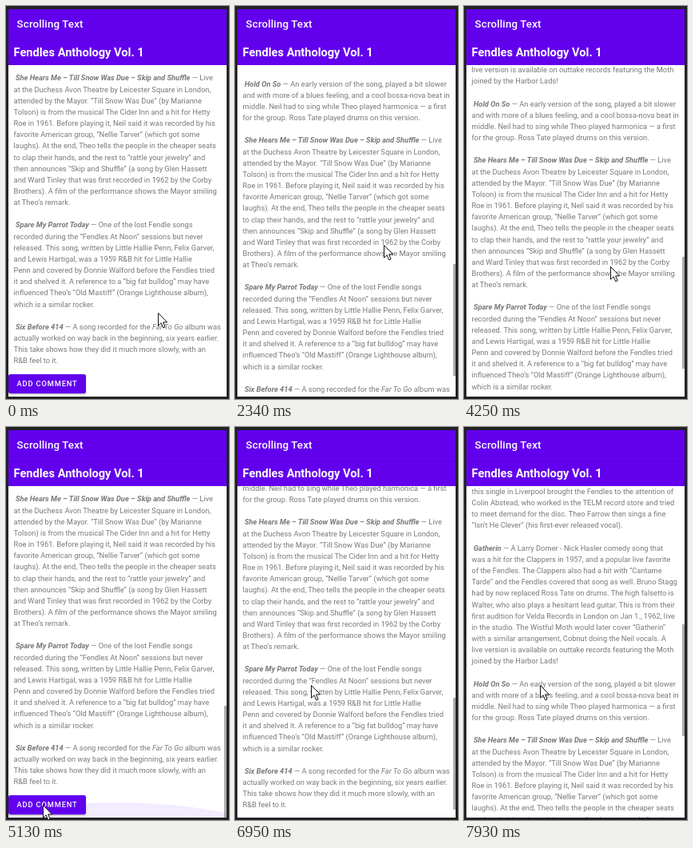
Write an HTML page that moves like this. It is 279 px wide and 492 px high and loops after 8 s.

```html
<!DOCTYPE html>
<html lang="en">
<head>
<meta charset="utf-8">
<title>Scrolling Text</title>
<style>
  html, body { margin: 0; width: 100%; height: 100%; overflow: hidden; background: #222225; }
  body { font-family: Roboto, "Open Sans", sans-serif; }
  #stage { position: relative; width: 279px; height: 492px; overflow: hidden; }
  #stage div, #stage svg { position: absolute; }
  #bar { left: 3px; top: 4px; width: 273px; height: 70px; background: #6200ee; color: #fff; white-space: pre; }
  #bar div { line-height: 20px; }
  #title { left: 10.6px; top: 9px; font-size: 13.28px; font-weight: 500; letter-spacing: .0125em; }
  #head { left: 6.6px; top: 44px; font-size: 14.6px; font-weight: 700; }
  #edge { left: 0; top: 38px; width: 273px; height: 2px; background: rgba(0,0,0,.06); }
  #view { left: 3px; top: 74px; width: 273px; height: 415px; overflow: hidden; background: #fff; }
  #page { left: 0; top: 0; }
  #text { left: 6.6px; top: -302px; font-size: 9.3px; line-height: 14.16px; color: #797979; white-space: pre; }
  #text b { font-style: italic; }
  #add { left: 0; top: 387px; width: 97px; height: 24px; border-radius: 2.7px; background: #6200ee;
    box-shadow: 0 1px 2px rgba(0,0,0,.35); color: #fff; font-size: 9.3px; font-weight: 500;
    letter-spacing: .0892em; line-height: 24px; text-indent: 10.6px; white-space: pre; }
  #thumb { right: 0; top: 0; width: 3px; height: 140px; background: rgba(0,0,0,.33); }
  #glow { left: 0; top: 0; }
  #cursor { left: 0; top: 0; overflow: visible; }
</style>
</head>
<body>
<div id="stage">
  <div id="view">
    <div id="page">
      <div id="text">this single in Liverpool brought the Fendles to the attention of
Colin Abstead, who worked in the TELM record store and tried
to meet demand for the disc. Theo Farrow then sings a fine
“Isn't He Clever” (his first-ever released vocal).

 <b>Gatherin</b> — A Larry Dorner - Nick Hasler comedy song that
was a hit for the Clappers in 1957, and a popular live favorite
of the Fendles. The Clappers also had a hit with “Cantame
Tarde” and the Fendles covered that song as well. Bruno Stagg
had by now replaced Ross Tate on drums. The high falsetto is
Walter, who also plays a hesitant lead guitar. This is from their
first audition for Velda Records in London on Jan 1., 1962, live
in the studio. The Wistful Moth would later cover “Gatherin”
with a similar arrangement, Cobnut doing the Neil vocals. A
live version is available on outtake records featuring the Moth
joined by the Harbor Lads!

 <b>Hold On So</b> — An early version of the song, played a bit slower
and with more of a blues feeling, and a cool bossa-nova beat in
middle. Neil had to sing while Theo played harmonica — a first
for the group. Ross Tate played drums on this version.

 <b>She Hears Me – Till Snow Was Due – Skip and Shuffle</b> — Live
at the Duchess Avon Theatre by Leicester Square in London,
attended by the Mayor. “Till Snow Was Due” (by Marianne
Tolson) is from the musical The Cider Inn and a hit for Hetty
Roe in 1961. Before playing it, Neil said it was recorded by his
favorite American group, “Nellie Tarver” (which got some
laughs). At the end, Theo tells the people in the cheaper seats
to clap their hands, and the rest to “rattle your jewelry” and
then announces “Skip and Shuffle” (a song by Glen Hassett
and Ward Tinley that was first recorded in 1962 by the Corby
Brothers). A film of the performance shows the Mayor smiling
at Theo’s remark.

 <b>Spare My Parrot Today</b> — One of the lost Fendle songs
recorded during the “Fendles At Noon” sessions but never
released. This song, written by Little Hallie Penn, Felix Garver,
and Lewis Hartigal, was a 1959 R&amp;B hit for Little Hallie
Penn and covered by Donnie Walford before the Fendles tried
it and shelved it. A reference to a “big fat bulldog” may have
influenced Theo’s “Old Mastiff” (Orange Lighthouse album),
which is a similar rocker.

 <b>Six Before 414</b> — A song recorded for the <i>Far To Go</i> album was
actually worked on way back in the beginning, six years earlier.
This take shows how they did it much more slowly, with an
R&amp;B feel to it.</div>
      <div id="add">ADD COMMENT</div>
    </div>
    <svg id="glow" width="273" height="415"><ellipse cx="136.5" cy="540" rx="328" ry="144" fill="#6200ee" fill-opacity=".08"/></svg>
    <div id="thumb"></div>
  </div>
  <div id="bar">
    <div id="edge"></div>
    <div id="title">Scrolling Text</div>
    <div id="head">Fendles Anthology Vol. 1</div>
  </div>
  <svg id="cursor" width="13" height="20"><path d="M.5 .5V16.2L4.1 12.8L6.7 18.9L9.1 17.9L6.6 11.9H11.6Z" fill="#fff" stroke="#111" stroke-linejoin="round"/></svg>
</div>
<script>
const LOOP = 8000, VIEW = 415, PAGE = 1233;

// Each move runs in even steps towards the values in `to`.
const moves = [
  { start: 430, end: 850, steps: 4, to: { x: 179, y: 330 } },
  { start: 1520, end: 2460, steps: 8, to: { x: 187, y: 295, shift: 89 } },
  { start: 2600, end: 3500, steps: 7, to: { x: 183, y: 327, shift: 148 } },
  { start: 4130, end: 4400, steps: 3, to: { y: 323, shift: 14 } },
  { start: 4720, end: 5130, steps: 4, to: { x: 46, y: 473, shift: 0 } },
  { start: 5280, end: 5690, steps: 4, to: { x: 59 } },
  { start: 5820, end: 6500, steps: 6, to: { x: 95, y: 323 }, lift: 111 },
  { start: 6810, end: 7930, steps: 9, to: { shift: 302 }, power: 1.55 }
];

function poseAt(t) {
  const pose = { x: 190, y: 384, shift: 0 };
  let tick = 0, scrolled = -Infinity;
  for (const { start, end, steps, to, lift = 0, power = 1 } of moves) {
    if (t < start) break;
    const i = Math.min(steps - 1, Math.floor((t - start) / (end - start) * (steps - 1) + 1e-6));
    const p = (i + 1) / steps;
    tick = start + (end - start) * i / (steps - 1);
    for (const key in to) pose[key] += (to[key] - pose[key]) * p ** power;
    pose.y -= lift * Math.sin(Math.PI * p);
    if ("shift" in to) scrolled = tick;
  }
  // the scroll bar and the glow fade out once scrolling stops
  pose.fade = Math.max(0, Math.min(1, 1 - (tick - scrolled - 100) / 300));
  return pose;
}

const el = id => document.getElementById(id);
const page = el("page"), thumb = el("thumb"), glow = el("glow"), cursor = el("cursor");

function draw(time) {
  const { x, y, shift, fade } = poseAt(time % LOOP);
  const thumbTop = VIEW - 140 - shift * VIEW / PAGE;
  page.style.transform = `translateY(${Math.round(shift)}px)`;
  thumb.style.transform = `translateY(${Math.round(thumbTop)}px)`;
  thumb.style.opacity = fade;
  glow.style.opacity = shift < 0.5 ? fade : 0;
  cursor.style.transform = `translate(${Math.round(x)}px, ${Math.round(y)}px)`;
}

const start = performance.now();
function loop() {
  draw(performance.now() - start);
  requestAnimationFrame(loop);
}
loop();
</script>
</body>
</html>
```
